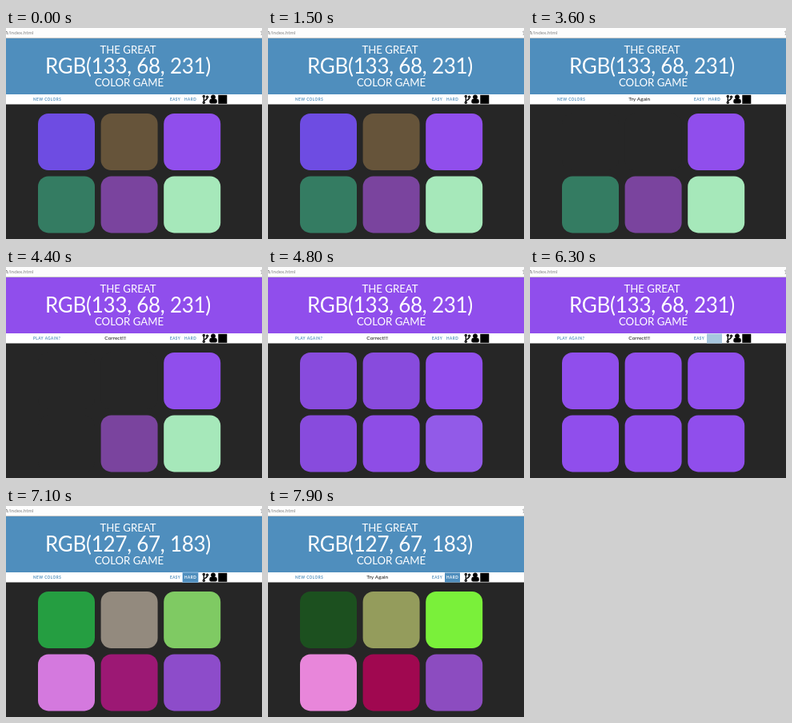
Recreate the animation shown at these times as an HTML page with a canvas. Size 320 px wide and 264 px high, loop 8 s.

```html
<!DOCTYPE html>
<html lang="en">
<head>
<meta charset="utf-8">
<title>Color Game</title>
<style>
  html, body { margin: 0; width: 100%; height: 100%; overflow: hidden; background: #262626; }
  canvas { display: block; }
</style>
</head>
<body>
<canvas id="stage" width="320" height="264"></canvas>
<script>
const ctx = document.getElementById('stage').getContext('2d');
const LOOP = 8000, STEP = 100, FADE = 600;

const DARK = [38, 38, 38], BLUE = [79, 142, 189], WHITE = [255, 255, 255];
const WIN = [144, 78, 236];
const FIRST = [[110, 76, 226], [102, 84, 58], WIN, [52, 124, 98], [122, 68, 158], [166, 232, 186]];
const SECOND = [[4, 182, 13], [148, 156, 92], [122, 240, 58], [232, 134, 218], [160, 8, 80], [140, 76, 192]];

// Moments of the player's actions, in ms
const MISS = 2100, SETTLE = 2900, WON = 4400, HOVER = 6200, RESTART = 6820, LAST_MISS = 7650;

// Each fade: start time, square index (or all), target colours
const fades = [
  { at: MISS, square: 1, to: [50, 48, 42] },
  { at: SETTLE, square: 1, to: DARK },
  { at: 2990, square: 0, to: DARK },
  { at: 3690, square: 3, to: DARK },
  ...FIRST.map((_, square) => ({ at: WON, square, to: WIN })),
  ...SECOND.map((to, square) => ({ at: RESTART, square, to })),
  { at: LAST_MISS, square: 0, to: DARK }
];

const clamp = v => Math.min(1, Math.max(0, v));
const mix = (a, b, p) => a.map((v, i) => v + (b[i] - v) * p);
const css = c => `rgb(${c.map(Math.round).join(',')})`;

// CSS "ease": cubic-bezier(.25, .1, .25, 1)
function ease(x) {
  if (x <= 0 || x >= 1) return clamp(x);
  const bez = (a, b, u) => 3 * a * u * (1 - u) ** 2 + 3 * b * u * u * (1 - u) + u ** 3;
  let lo = 0, hi = 1;
  for (let i = 0; i < 24; i++) {
    const mid = (lo + hi) / 2;
    if (bez(.25, .25, mid) < x) lo = mid; else hi = mid;
  }
  return bez(.1, 1, lo);
}

function squareColor(i, t) {
  let color = FIRST[i];
  for (const f of fades) {
    if (f.square === i && t > f.at) color = mix(color, f.to, ease((t - f.at) / FADE));
  }
  return color;
}

function rect(x, y, w, h, color, r = 0) {
  ctx.fillStyle = color;
  ctx.beginPath();
  ctx.roundRect(x, y, w, h, r);
  ctx.fill();
}

function dot(x, y, r) {
  ctx.beginPath();
  ctx.arc(x, y, r, 0, Math.PI * 2);
}

function text(str, x, y, size, color, { weight = 400, align = 'left', gap = 0 } = {}) {
  ctx.font = `${weight} ${size}px Lato, sans-serif`;
  ctx.letterSpacing = gap + 'px';
  ctx.textAlign = align;
  ctx.fillStyle = color;
  ctx.fillText(str, x, y);
}

function drawBrowserBar() {
  rect(0, 0, 320, 13, '#fdfdfd');
  rect(0, 12, 320, 1, '#c9c9c9');
  text('m', -3.6, 8, 6.6, '#333');
  text('/index.html', 2.2, 8, 6.4, '#858585');
  ctx.strokeStyle = '#999';
  ctx.lineWidth = .8;
  ctx.beginPath();
  ctx.moveTo(321, 3.5);
  ctx.lineTo(318.5, 4.5);
  ctx.lineTo(320, 6.5);
  ctx.lineTo(319, 9);
  ctx.stroke();
}

function drawHeader(won, rgb) {
  const center = { align: 'center' };
  rect(0, 13, 320, 70, css(won ? WIN : BLUE));
  text('THE GREAT', 152.5, 31.8, 13.2, '#fff', center);
  text(rgb, 152.5, 57, 26, '#fff', { align: 'center', gap: -.27 });
  text('COLOR GAME', 154, 73, 13.2, '#fff', center);
}

function drawIcons() {
  ctx.strokeStyle = ctx.fillStyle = '#000';
  ctx.lineWidth = 1.3;
  for (const [x, y] of [[247.3, 85.4], [251.6, 86.2], [247.3, 93.2]]) {
    dot(x, y, 1.1);
    ctx.stroke();
  }
  ctx.beginPath();
  ctx.moveTo(247.3, 86.5);
  ctx.lineTo(247.3, 92);
  ctx.moveTo(251.6, 87.3);
  ctx.quadraticCurveTo(251.8, 89.4, 247.5, 91);
  ctx.stroke();

  dot(259, 86.3, 2.9);
  ctx.fill();
  ctx.beginPath();
  ctx.roundRect(254.3, 88.6, 9.5, 6, [3.2, 3.2, 2, 2]);
  ctx.fill();

  rect(265.3, 83.8, 11, 11, '#000');
}

function drawNav(t, won, message) {
  const label = { weight: 700, gap: .5 };
  const hover = clamp((t - HOVER) / 200);
  rect(0, 83, 320, 12.5, '#fff');
  text(won ? 'PLAY AGAIN?' : 'NEW COLORS', 34, 91.2, 4.6, css(BLUE), label);
  text(message, 136.7, 91.4, 6.5, '#111', { align: 'center' });
  text('EASY', 205, 91.2, 4.6, css(BLUE), label);
  if (hover > 0) {
    const focused = t > RESTART && t < LAST_MISS;
    if (focused) rect(220.2, 82.8, 20.6, 13.2, '#a9cdee', 1);
    rect(221, 83.5, 19, 12, css(mix(WHITE, BLUE, hover)));
  }
  text('HARD', 223, 91.2, 4.6, css(mix(BLUE, WHITE, hover)), label);
  drawIcons();
}

function draw(t) {
  const won = t >= WON && t < RESTART;
  const restarted = t >= RESTART;
  const missed = (t >= MISS && t < WON) || t >= LAST_MISS;
  rect(0, 0, 320, 264, css(DARK));
  drawBrowserBar();
  drawHeader(won, restarted ? 'RGB(127, 67, 183)' : 'RGB(133, 68, 231)');
  drawNav(t, won, won ? 'Correct!!!' : missed ? 'Try Again' : '');
  for (let i = 0; i < 6; i++) {
    const x = 40 + (i % 3) * 78.6, y = 107 + Math.floor(i / 3) * 78.4;
    rect(x, y, 71, 71, css(squareColor(i, t)), 13);
  }
}

const start = performance.now();
function tick() {
  const t = (performance.now() - start) % LOOP;
  draw(Math.floor(t / STEP) * STEP);
  requestAnimationFrame(tick);
}
tick();
</script>
</body>
</html>
```
